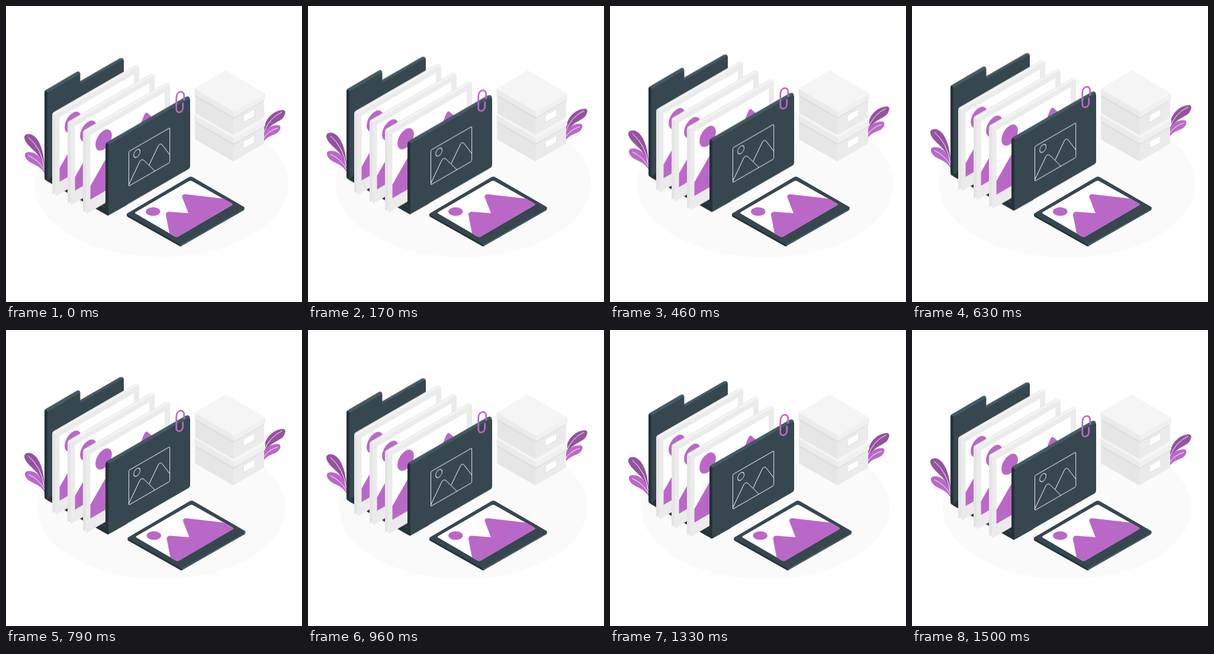
Write an HTML page without scripts that moves like this. It is 500 px wide and 500 px high and loops after 1.54 s.

```html
<!DOCTYPE html>
<html lang="en">
<head>
<meta charset="utf-8">
<title>Photo folder</title>
<style>
  html, body { margin: 0; width: 100%; height: 100%; overflow: hidden; background: #fff; }
  svg { display: block; width: 100%; height: 100%; }
  .purple { fill: #ba68c8; }
  .plum { fill: #9552a0; }
  .dark { fill: #37474f; }
  .darker { fill: #263238; }
  .edge { fill: #455a64; }
  .line { fill: none; stroke: #fff; stroke-width: 1; stroke-linejoin: round; stroke-linecap: round; }
  .float { animation: float 1540ms linear infinite; }
  .tablet { animation: shake 1540ms linear infinite; }
  .ground { fill: #fafafa; transform-origin: 262px 300px; animation: swell 1540ms linear infinite; }
  @keyframes float {
    0%, 100% { transform: translateY(.7px); }
    46.75% { transform: translateY(-8.8px); }
    97.4% { transform: translateY(1.2px); }
  }
  @keyframes shake {
    0%, 100% { transform: translateX(0); }
    21.4%, 40.9% { transform: translateX(2px); }
    62.3% { transform: translateX(1px); }
    76% { transform: translateX(1.8px); }
    86.4% { transform: translateX(5.4px); }
    97.4% { transform: translateX(1.9px); }
  }
  @keyframes swell {
    0% { transform: scale(1.023); }
    50% { transform: scale(1.036); }
    50.01%, 100% { transform: scale(1); }
  }
</style>
</head>
<body>
<svg viewBox="0 0 500 500" xmlns="http://www.w3.org/2000/svg">
  <defs>
    <g id="sheet">
      <rect width="164" height="138" rx="3" fill="#e4e4e4" transform="matrix(.866 -.5 0 1 130 210)"/>
      <path d="M131 210.500L271 129.300q2-1 3.500 0L277 131 135 214z" fill="#f3f3f3"/>
      <g transform="matrix(.866 -.5 0 1 135 213)">
        <rect width="164" height="138" rx="3" fill="#ebebeb"/>
        <rect x="8.700" y="8.500" width="145" height="109" fill="#fff"/>
        <circle class="purple" cx="34.600" cy="30" r="16"/>
        <path class="purple" d="M8.700 94.500L42 60.500q4-4 8 0L78 89 113 28.300q4-6 8 0L153.700 69v48.500H8.700z"/>
      </g>
    </g>
    <g id="box">
      <path d="M319.500 148L384 186V218L319.500 181z" fill="#e6e6e6"/>
      <path d="M384 186L436 156V188L384 218z" fill="#ebebeb"/>
      <path d="M319.500 150L384 187 436 157V160L384 190.500 319.500 153z" fill="#dedede"/>
      <path d="M318.500 139L385 178V188L318.500 149.500z" fill="#ebebeb"/>
      <path d="M385 178L438 148V157.500L385 188z" fill="#f0f0f0"/>
      <path d="M318.500 139.500L371 108.800 438.500 148 385 178.500z" fill="#f5f5f5"/>
      <path d="M401 184.500L420 174V186L401 196.500z" fill="#fff" stroke="#e0e0e0"/>
    </g>
  </defs>

  <ellipse class="ground" cx="262" cy="300" rx="210" ry="121"/>

  <g class="float">
    <path class="plum" d="M436 216V208C437 188 455 174 469 175Q474 177 470 185C465 196 447 195 436 216z"/>
    <path class="purple" d="M434 230V218C438 205 452 199 462 201Q466 205 460 212C453 219 444 216 434 230z"/>
    <path class="line" d="M436 212Q445 188 466 178.500M435 223Q443 210 459 205.500"/>
  </g>

  <use href="#box" y="44.500"/>
  <use href="#box"/>

  <g class="float">
    <path class="plum" d="M65 277C60 244 37 242 31 223Q30 216 37 215.500C55 214 66 247 65 277z"/>
    <path class="purple" d="M66 283C55 263 38 269 32 253Q31 246 38 246C52 245 65 259 66 283z"/>
    <path class="line" d="M38 221Q60 240 64.500 272M38 252Q55 259 65 277"/>

    <path class="edge" d="M65 145Q65 142.500 67 141.300L119.500 110.500Q122 109 124 110.500 125.500 111.500 125.500 114V126L192 87.800Q195 86.500 197.500 88 199 89 199 91.500V222L70 295z"/>
    <path class="darker" d="M65 290V145Q65 143 66.500 142.500L71 146V295.500L67 293.500Q65 292.500 65 290z"/>
    <path class="dark" d="M70 295V148.500Q70 146 72 144.800L122 115.500Q125 114 125 117V131L195.500 91Q199 89.500 199 93V222z"/>
    <path class="darker" d="M69 295L172 353.500 205 335 85 279z"/>
    <path d="M156 333L168.500 340.500V344" fill="none" stroke="#455a64"/>

    <use href="#sheet" x="-52" y="-30"/>
    <use href="#sheet" x="-26" y="-15"/>
    <use href="#sheet"/>

    <rect class="darker" width="159" height="119" rx="4" transform="matrix(.866 -.5 0 1 168 231)"/>
    <path class="edge" d="M169.500 230L304 152.800q3-1.500 5 0L311 155 174 234z"/>
    <g transform="matrix(.866 -.5 0 1 173 234)">
      <rect class="dark" width="159.400" height="119" rx="4"/>
      <rect class="line" x="39.800" y="31" width="80" height="58.500" rx="2"/>
      <circle class="line" cx="55.600" cy="42" r="6.200"/>
    </g>
    <path class="line" d="M207.500 301L226 262Q229 257 233 260L251.500 278M242 267.500L257 236Q260 230 264 234L276.500 250.500"/>

    <path d="M300.800 157.500V150.500C300.800 140.500 287.800 142.500 287.800 154.500V174C287.800 181.500 298.800 180 298.800 171V164" fill="none" stroke="#ba68c8" stroke-width="2.800" stroke-linecap="round"/>
  </g>

  <g class="tablet">
    <path class="darker" d="M204 350.500V354Q204 355.500 206 356.500L293 405.500Q295 406.500 297 405.500V395z"/>
    <path class="edge" d="M295 398V406.300L401 345.500Q403 344 403 341z"/>
    <path class="dark" d="M206 349.500L309 289Q312 287.300 315 289L401 338.800Q404.500 341 401 343.200L298 401.500Q295 403 292 401.500L206 353.500Q202.500 351.500 206 349.500z"/>
    <path d="M219 348L309 295.800Q312 294.300 315 296.300L381 333.600Q384 335 381 336.800L291 389.300Q288 391 285 389.300L219 350.800Q217 349.500 219 348z" fill="#fff"/>
    <ellipse class="purple" cx="248.300" cy="347.300" rx="12.200" ry="7.200"/>
    <path class="purple" d="M276 384L270 353Q270 348 275 347.500L308 350 297.500 323Q296.500 318 303 318L368 325.500 381 333.200Q384.500 335 381 337L291 389.500Q288 391 285 389.300z"/>
  </g>
</svg>
</body>
</html>
```
